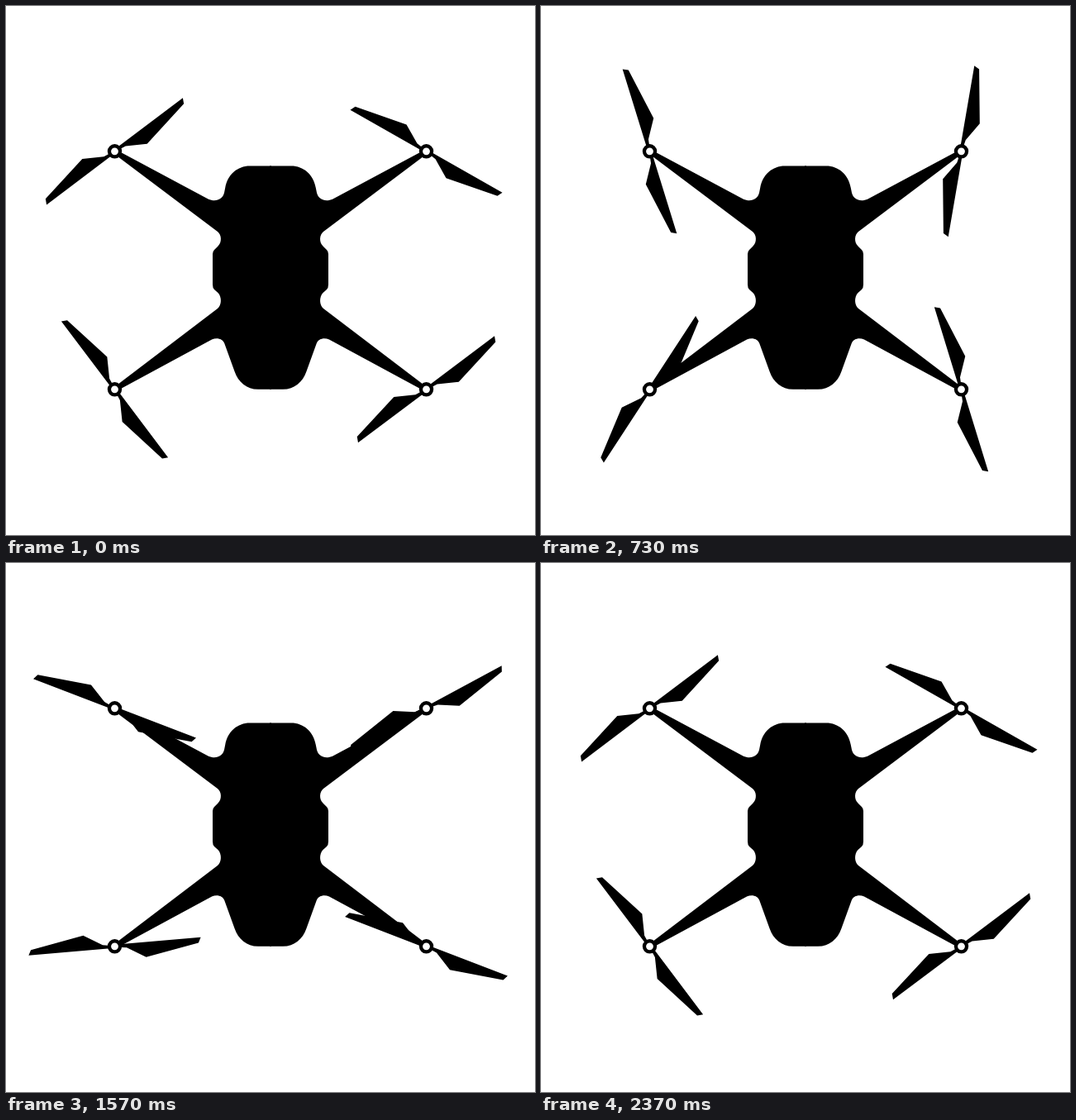
Animation, 640 px wide and 640 px high, one loop 2.41 s. Source, as an HTML page with a canvas:

```html
<!DOCTYPE html>
<html lang="en">
<head>
<meta charset="utf-8">
<title>Drone</title>
<style>
  html, body { margin: 0; width: 100%; height: 100%; overflow: hidden; background: #fff; }
  canvas { display: block; width: 640px; height: 640px; }
</style>
</head>
<body>
<canvas id="stage" width="640" height="640"></canvas>
<script>
const ctx = document.getElementById('stage').getContext('2d');

const LOOP = 2410;      // ms
const LAST_TICK = 71;   // ticks run at 30 per second
const LAST_POSE = 59;   // poses that make up one full turn

// Rest angle in degrees; spin 1 is clockwise.
const rotors = [
  { x: 131.5, y: 175.8, rest: -38.1, spin: 1 },
  { x: 508.5, y: 175.8, rest: 28.5, spin: -1 },
  { x: 131.5, y: 463.8, rest: 51.9, spin: -1 },
  { x: 508.5, y: 463.8, rest: -38, spin: 1 }
];

// Left half of body and arms; the right half is its mirror image.
const halfBody = new Path2D(`
  M321 193.5 H295 C280 193.5 268 204 265.2 220 L264 226
  C262 234.5 253 237.5 244.5 233.4 L138 176.5 L135 182 L256 273
  C261 277 261.3 286 256.5 290.5 L252 295 Q250 297 250 300
  V337 Q250 341 252 343 L256.5 347
  C261.3 352 261 362 256 366 L135 458 L138.5 463.3 L249 403.6
  C255 400.6 262 402.5 264.2 408 L276.5 442
  C281 455 291 463.8 305 463.8 H321 Z`);

const blade = new Path2D('M0 -2 L104.7 0 L101.3 6.4 L36.5 17 L14.3 3.1 L8 2 H0 Z');

function poseAt(time) {
  const centis = Math.floor(time / 10);
  const tick = Math.min(LAST_TICK, Math.floor((centis * 10 + 5) * 0.03));
  return Math.round(tick * LAST_POSE / LAST_TICK);
}

function disc(x, y, radius, color) {
  ctx.fillStyle = color;
  ctx.beginPath();
  ctx.arc(x, y, radius, 0, Math.PI * 2);
  ctx.fill();
}

function drawBody() {
  ctx.fillStyle = '#000';
  ctx.fill(halfBody);
  ctx.save();
  ctx.translate(640, 0);
  ctx.scale(-1, 1);
  ctx.fill(halfBody);
  ctx.restore();
}

function drawRotor({ x, y, rest, spin }, turn) {
  ctx.save();
  ctx.translate(x, y);
  ctx.rotate((rest + spin * turn) * Math.PI / 180);
  ctx.fillStyle = '#000';
  ctx.fill(blade);
  ctx.rotate(Math.PI);
  ctx.fill(blade);
  ctx.restore();
  disc(x, y, 8.7, '#000');
  disc(x, y, 4.4, '#fff');
}

function render(time) {
  const turn = poseAt(time) / LAST_POSE * 360;
  ctx.fillStyle = '#fff';
  ctx.fillRect(0, 0, 640, 640);
  drawBody();
  rotors.forEach(rotor => drawRotor(rotor, turn));
}

const start = performance.now();
function loop() {
  render((performance.now() - start) % LOOP);
  requestAnimationFrame(loop);
}
loop();
</script>
</body>
</html>
```
